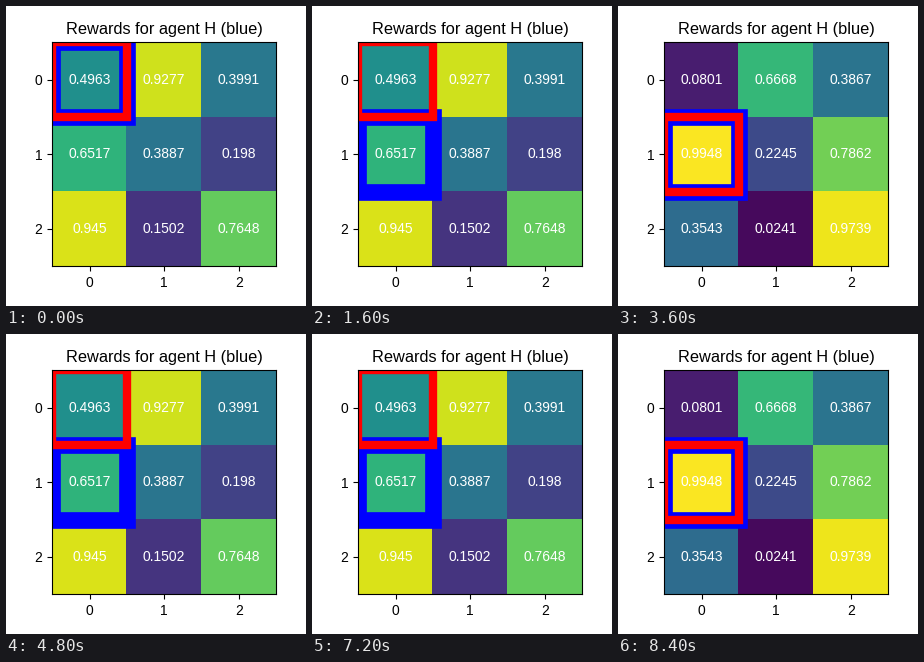
A matplotlib script that plays this animation: 300x300 px, repeating every 8.8 s.

```python
import matplotlib.pyplot as plt
import numpy as np
from matplotlib.animation import FuncAnimation
from matplotlib.patches import Rectangle

SIZE, DPI = 300, 100
STEP_MS, STEPS = 400, 22
START_STEPS = 2  # both agents rest in the first cell before they alternate
LEFT, TOP, SIDE = 46.3, 36.4, 223.8

# Values printed in the cells, one payoff grid for each row of the red agent
REWARDS = np.array([
    0.4963, 0.9277, 0.3991, 0.6517, 0.3887, 0.198, 0.945, 0.1502, 0.7648,
    0.0801, 0.6668, 0.3867, 0.9948, 0.2245, 0.7862, 0.3543, 0.0241, 0.9739,
]).reshape(2, 3, 3)

plt.rcParams["font.family"] = "Liberation Sans"
fig = plt.figure(figsize=(SIZE / DPI, SIZE / DPI), dpi=DPI)
ax = fig.add_axes([LEFT / SIZE, 1 - (TOP + SIDE) / SIZE, SIDE / SIZE, SIDE / SIZE])
ax.set_title("Rewards for agent H (blue)", fontsize=11.8)

image = ax.imshow(REWARDS[0], cmap="viridis", vmin=0, vmax=1)
ax.set(xticks=range(3), yticks=range(3))
labels = {
    (row, col): ax.text(col, row, "", color="white", ha="center", va="center", fontsize=10)
    for row, col in np.ndindex(3, 3)
}


def add_marker(color, width):
    return ax.add_patch(Rectangle((-0.5, -0.5), 1, 1, fill=False, ec=color, lw=width))


blue = add_marker("blue", 12)
red = add_marker("red", 6)


def agent_rows(step):
    """Blue moves down once; from then on red alternates between two rows."""
    moved = step >= START_STEPS
    return int(moved), step % 2 if moved else 0


def draw(step):
    blue_row, red_row = agent_rows(step)
    grid = REWARDS[red_row]
    image.set_data(grid)
    for cell, label in labels.items():
        label.set_text(f"{grid[cell]:g}")
    blue.set_y(blue_row - 0.5)
    red.set_y(red_row - 0.5)
    return [image, blue, red, *labels.values()]


anim = FuncAnimation(fig, draw, frames=STEPS, interval=STEP_MS, repeat=True)
plt.show()
```
